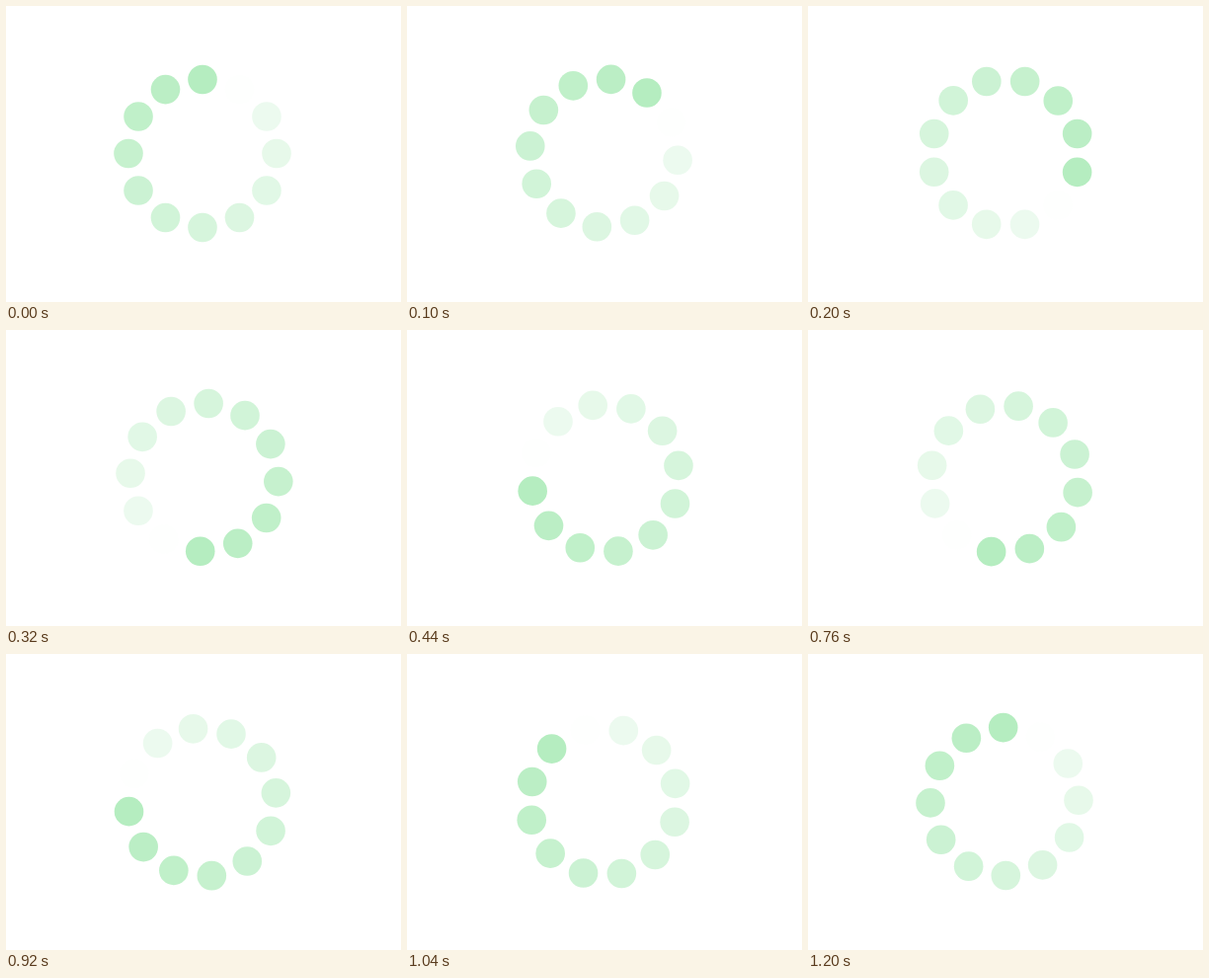
These frames come from a looping animation (400 px wide and 300 px high, 1220 ms). An HTML page with a canvas:

```html
<!DOCTYPE html>
<html lang="en">
<head>
<meta charset="utf-8">
<title>Spinner</title>
<style>
  html, body { margin: 0; width: 100%; height: 100%; overflow: hidden; background: #fff; }
  canvas { display: block; }
</style>
</head>
<body>
<canvas id="stage" width="400" height="300"></canvas>
<script>
const ctx = document.getElementById('stage').getContext('2d');

const LOOP = 1220, TICK = 20, TURN_TIME = 1200;
const DOTS = 12, RING = 75, DOT_RADIUS = 14.8;
const TURN = 359 * Math.PI / 180;
const OFFSET = { size: 1.1, angle: -156 * Math.PI / 180 };

// Moments at which the highlight hops to the next dot.
const HOPS = [140, 280, 400, 480, 540, 600, 640, 700, 760, 820, 940, 1080];

const bezier = (a, b, u) =>
  3 * a * u * (1 - u) ** 2 + 3 * b * u * u * (1 - u) + u ** 3;

// Linear start, soft landing.
function ease(x) {
  let low = 0, high = 1;
  for (let i = 0; i < 30; i++) {
    const mid = (low + high) / 2;
    if (bezier(1 / 6, 2 / 3, mid) < x) low = mid; else high = mid;
  }
  return bezier(1 / 6, 1, (low + high) / 2);
}

const opacity = age => age === DOTS - 1 ? 0.015 : 1 - 0.075 * age;

function draw(time) {
  const t = Math.floor((time % LOOP) / TICK) * TICK;
  const spin = TURN * ease(Math.min(t / TURN_TIME, 1));
  const head = HOPS.filter(hop => hop <= t).length;

  // The ring turns around a point slightly beside its own centre.
  const cx = 200 + OFFSET.size * Math.cos(OFFSET.angle + spin);
  const cy = 150 + OFFSET.size * Math.sin(OFFSET.angle + spin);

  ctx.clearRect(0, 0, 400, 300);
  for (let age = 0; age < DOTS; age++) {
    const angle = spin + (head - age) * 2 * Math.PI / DOTS - Math.PI / 2;
    ctx.fillStyle = `rgba(181, 237, 192, ${opacity(age)})`;
    ctx.beginPath();
    ctx.arc(cx + RING * Math.cos(angle), cy + RING * Math.sin(angle),
            DOT_RADIUS, 0, 2 * Math.PI);
    ctx.fill();
  }
}

const start = performance.now();
function loop() {
  draw(performance.now() - start);
  requestAnimationFrame(loop);
}
loop();
</script>
</body>
</html>
```
